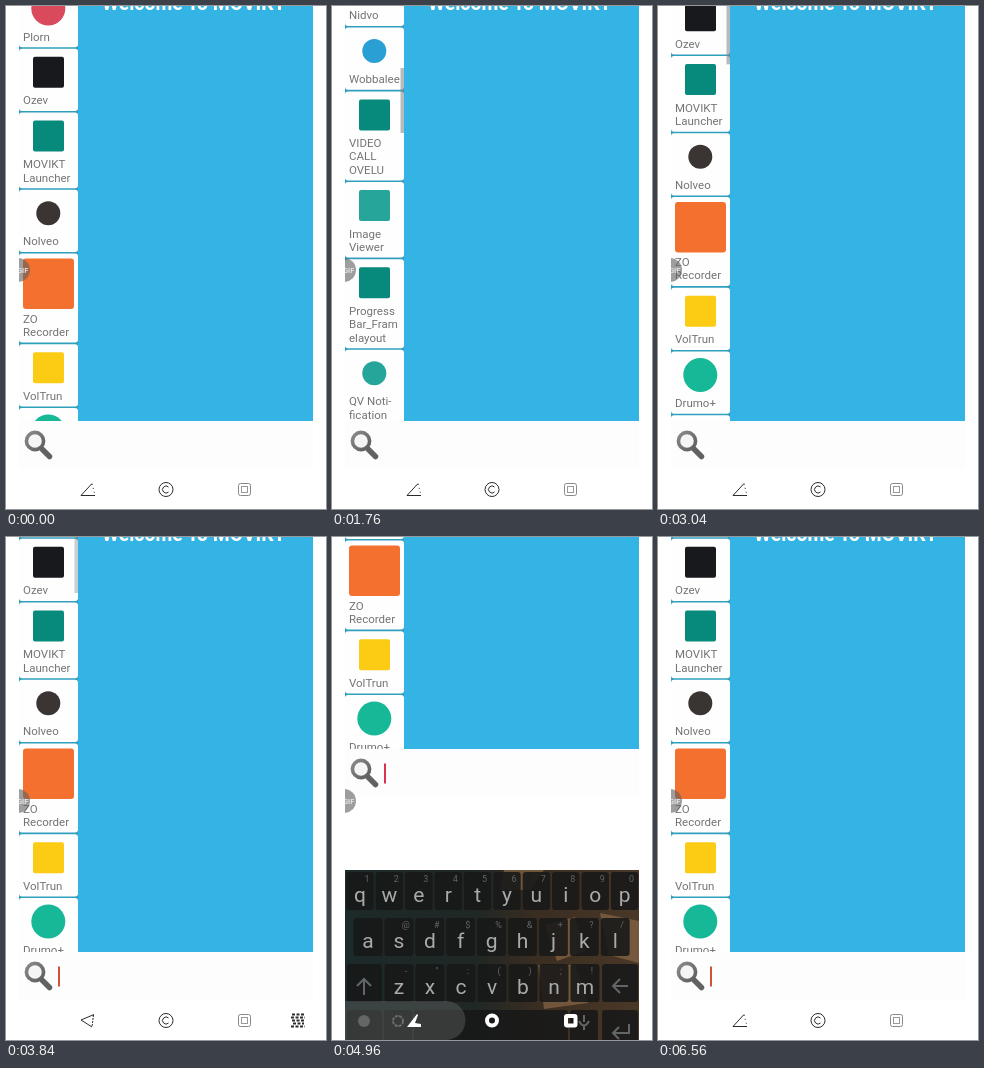
Recreate the animation shown at these times as an HTML page. Size 320 by 503 pixels, loop 6.72 s.

```html
<!DOCTYPE html>
<html lang="en">
<head>
<meta charset="utf-8">
<title>Launcher</title>
<style>
html, body { margin: 0; width: 100%; height: 100%; overflow: hidden; background: #fff; }
svg { display: block; width: 100vw; height: 100vh; }
text { font-family: Roboto, Arial, sans-serif; }
.label { font-size: 11.5px; fill: #747474; }
.title { font-size: 19.4px; font-weight: 700; fill: #fff; }
.key { fill: #171818; fill-opacity: .88; }
.letter { font-size: 21px; fill: #a9abab; text-anchor: middle; }
.hint { font-size: 9px; fill: #626565; text-anchor: middle; }
.line { fill: none; stroke: #2b2b2b; }
.special { fill: none; stroke: #626666; stroke-width: 2; }
</style>
</head>
<body>
<svg viewBox="0 0 320 503">
  <defs>
    <clipPath id="screen"><rect x="13" width="294" height="503"/></clipPath>
    <clipPath id="sidebar"><rect x="13" width="59" height="415"/></clipPath>
    <clipPath id="keyArea"><rect id="keyClip" x="13" y="200" width="294" height="263"/></clipPath>
    <linearGradient id="backdrop">
      <stop offset="0" stop-color="#1c2a29"/>
      <stop offset=".45" stop-color="#202725"/>
      <stop offset=".65" stop-color="#3a2d21"/>
      <stop offset="1" stop-color="#4a3827"/>
    </linearGradient>
    <linearGradient id="steel" x2="1" y2="1">
      <stop offset="0" stop-color="#8b8b8b"/>
      <stop offset="1" stop-color="#5d5d5d"/>
    </linearGradient>
  </defs>
  <rect width="320" height="503" fill="#fff"/>

  <g clip-path="url(#screen)">
    <g id="app">
      <rect x="72" width="235" height="415" fill="#34b4e4"/>
      <text class="title" x="96" y="4">Welcome To MOVIKT</text>
      <g clip-path="url(#sidebar)">
        <rect x="13" width="59" height="415" fill="#2e9fbd"/>
        <g id="list"></g>
        <rect id="scrollbar" x="68.5" width="3.5" height="65" fill="#7d858a"/>
      </g>
      <rect x="13" y="415" width="294" height="48" fill="#fdfdfd"/>
      <path d="M36 443 43.5 450.5" stroke="#626262" stroke-width="5.5" stroke-linecap="round"/>
      <circle cx="29" cy="435" r="8.6" fill="#f5f5f5" stroke="url(#steel)" stroke-width="3.6"/>
      <rect id="cursor" x="52" y="429.5" width="2" height="20" fill="#d2523c"/>
    </g>
    <g clip-path="url(#keyArea)"><g id="keyboard">
      <rect x="13" y="333" width="294" height="205" fill="url(#backdrop)"/>
      <path d="M172 333h40l-14 20h-30zM213 388l30-8 10 34-28 10zM268 376l39 8v42l-30-8zM206 428h38l12 38-44 6z" fill="#94714b" opacity=".6"/>
      <g id="keys"></g>
      <path class="special" d="M32 458V442M25 449l7-7 7 7M296 449H281M288 442l-7 7 7 7M297 487v9H281M287 490l-6 6 6 6"/>
      <circle cx="32" cy="484" r="6" fill="#555b59"/>
      <circle class="special" cx="66" cy="484" r="5" stroke-dasharray="3 1"/>
      <path class="special" d="M252 478v7M247 484q5 9 10 0M252 489v4"/>
    </g></g>
    <circle cx="12" cy="264" r="12" fill="#626262" fill-opacity=".62"/>
    <text x="11" y="267" font-size="7.5" font-weight="500" fill="#eee">GIF</text>
    <path id="ripple" d="M13 464H114A19.5 19.5 0 0 1 114 503H13z" fill="#808080" fill-opacity=".3"/>
  </g>

  <g id="navLight">
    <g id="back">
      <path class="line" d="M89 489.5H75L86 477.5"/>
      <path class="line" d="M86 478l3 11" stroke-dasharray="1 3"/>
    </g>
    <g id="down">
      <path class="line" d="M88 477.5 75 483 86 490"/>
      <path class="line" d="M87.5 478 86 490" stroke-dasharray="2 1"/>
    </g>
    <circle class="line" cx="160" cy="483.5" r="7"/>
    <path class="line" d="M162.5 481a3.5 3.5 0 1 0 0 5"/>
    <rect class="line" x="232.5" y="477.5" width="12" height="12" rx="2" style="stroke:#888"/>
    <rect class="line" x="235.5" y="480.5" width="6" height="6" style="stroke:#999"/>
    <path id="switcher" class="line" d="M286 477.5h13M285 480.5h14M286 483.5h13M287 486.5h11M285 489.5h14" stroke-width="2" stroke-dasharray="3 1.5"/>
  </g>
  <g id="navDark" fill="#fff">
    <path d="M75 490 85 477l1 1-3 8 6 1v3z"/>
    <circle cx="160" cy="483.5" r="5" fill="none" stroke="#fff" stroke-width="4"/>
    <rect x="234" y="479" width="9.5" height="9.5" rx="1" fill="none" stroke="#fff" stroke-width="4"/>
  </g>
</svg>
<script>
(() => {
  const $ = id => document.getElementById(id);

  function add(parent, tag, attrs, content) {
    const node = document.createElementNS('http://www.w3.org/2000/svg', tag);
    for (const name in attrs) node.setAttribute(name, attrs[name]);
    if (content) node.textContent = content;
    parent.append(node);
  	return node;
  }

  // Each app: label lines, icon colour, icon shape
  const apps = [
    ['Plorn', '#d94a5c', 'circle'],
    ['Ozev', '#17191d', 'square'],
    ['MOVIKT|Launcher', '#07897b', 'square'],
    ['Nolveo', '#3a3533', 'small'],
    ['ZO|Recorder', '#f4702f', 'large'],
    ['VolTrun', '#fccb14', 'square'],
    ['Drumo+', '#16b897', 'circle'],
    ['Nidvo', '#e2151c', 'square'],
    ['Wobbalee', '#2a9fd4', 'small'],
    ['VIDEO|CALL|OVELU', '#07897b', 'square'],
    ['Image|Viewer', '#26a69a', 'square'],
    ['Progress|Bar_Fram|elayout', '#07897b', 'square'],
    ['QV Noti-|fication|Blocker', '#26a69a', 'small'],
    ['Viewer', '#07897b', 'square']
  ];

  let cardTop = -64;
  for (const [label, fill, shape] of apps) {
    const lines = label.split('|');
    const large = shape === 'large';
    const height = 62.2 + 13.4 * (lines.length - 1) + (large ? 13.4 : 0);
    const card = add($('list'), 'g', { transform: `translate(0 ${cardTop})` });
    add(card, 'rect', { x: 13, width: 59, height, rx: 3, fill: '#fefefe' });
    if (large) add(card, 'rect', { x: 17, y: 5, width: 51, height: 50.5, rx: 3, fill });
    else if (shape === 'square') add(card, 'rect', { x: 27, y: 8, width: 31, height: 31, rx: 2, fill });
    else add(card, 'circle', { cx: 42.3, cy: 23.5, r: shape === 'circle' ? 17 : 12, fill });
    lines.forEach((line, i) =>
      add(card, 'text', { class: 'label', x: 17, y: (large ? 69 : 55.7) + 13.4 * i }, line));
    cardTop += height + 1.6;
  }

  function keyRow(letters, hints, firstX, pitch, y) {
    [...letters].forEach((letter, i) => {
      const x = firstX + pitch * i;
      add($('keys'), 'rect', { class: 'key', x: x - pitch / 2 + 1, y, width: pitch - 2, height: 38, rx: 3 });
      add($('keys'), 'text', { class: 'letter', x, y: y + 30 }, letter);
      add($('keys'), 'text', { class: 'hint', x: x + 7, y: y + 10 }, hints[i]);
    });
  }
  keyRow('qwertyuiop', '1234567890', 28, 29.4, 335);
  keyRow('asdfghjkl', ' @#$%&+?/', 36, 30.9, 381);
  keyRow('zxcvbnm', '-":();!', 67, 31, 427);
  for (const [x, y, width] of [[15, 427, 35], [270, 427, 36], [15, 473, 35], [52, 473, 28],
                               [82, 473, 154], [238, 473, 28], [270, 473, 36]])
    add($('keys'), 'rect', { class: 'key', x, y, width, height: 38, rx: 3 });

  // Tracks of [time, value]; each value holds until the next time
  const LOOP = 6720, STEP = 160;
  const listY = [[0, 43], [640, 25], [800, -70], [960, -180], [1120, -275], [1280, -350],
    [1440, -405], [1600, -440], [1760, -465], [1920, -485], [2080, -495], [2400, -472],
    [2560, -370], [2720, -215], [2880, -85], [3040, -13.5], [3200, -2], [3360, 2]];
  const keyboardY = [[0, 200], [4000, 30], [4160, -60], [4320, -73], [4960, 0], [5120, 200]];
  const cursorOn = [[0, 0], [3680, 1], [4160, 0], [4480, 1], [5280, 0], [5600, 1], [6080, 0], [6560, 1]];
  const barOpacity = [[0, 0], [640, .55], [2240, .4], [2400, .55], [3680, .4], [4000, 0]];

  const held = (track, t) => track.filter(([time]) => time <= t).pop()[1];
  const within = (t, from, to) => t >= from && t < to;
  const show = (id, on) => { $(id).style.display = on ? '' : 'none'; };
  const moveY = (id, y) => $(id).setAttribute('transform', `translate(0 ${y})`);

  function draw(now) {
    const t = Math.floor(now % LOOP / STEP) * STEP;
    const y = held(listY, t);
    const closing = within(t, 4960, 5120);
    const typing = within(t, 3840, 5120);

    moveY('list', y);
    moveY('app', within(t, 4000, 5120) ? -203 : 0);
    moveY('keyboard', held(keyboardY, t));
    $('scrollbar').setAttribute('y', -9 + .152 * (2 - y));
    $('scrollbar').style.opacity = held(barOpacity, t);
    $('keyClip').setAttribute('height', closing ? 303 : 263);
    $('cursor').setAttribute('fill', closing ? '#d8324f' : '#d2523c');

    show('keyboard', within(t, 4000, 5120));
    show('cursor', held(cursorOn, t));
    show('ripple', within(t, 4800, 5120));
    show('navLight', !closing);
    show('navDark', closing);
    show('back', !typing);
    show('down', typing);
    show('switcher', typing);
  }

  const start = performance.now();
  function tick() {
    draw(performance.now() - start);
    requestAnimationFrame(tick);
  }
  tick();
})();
</script>
</body>
</html>
```
